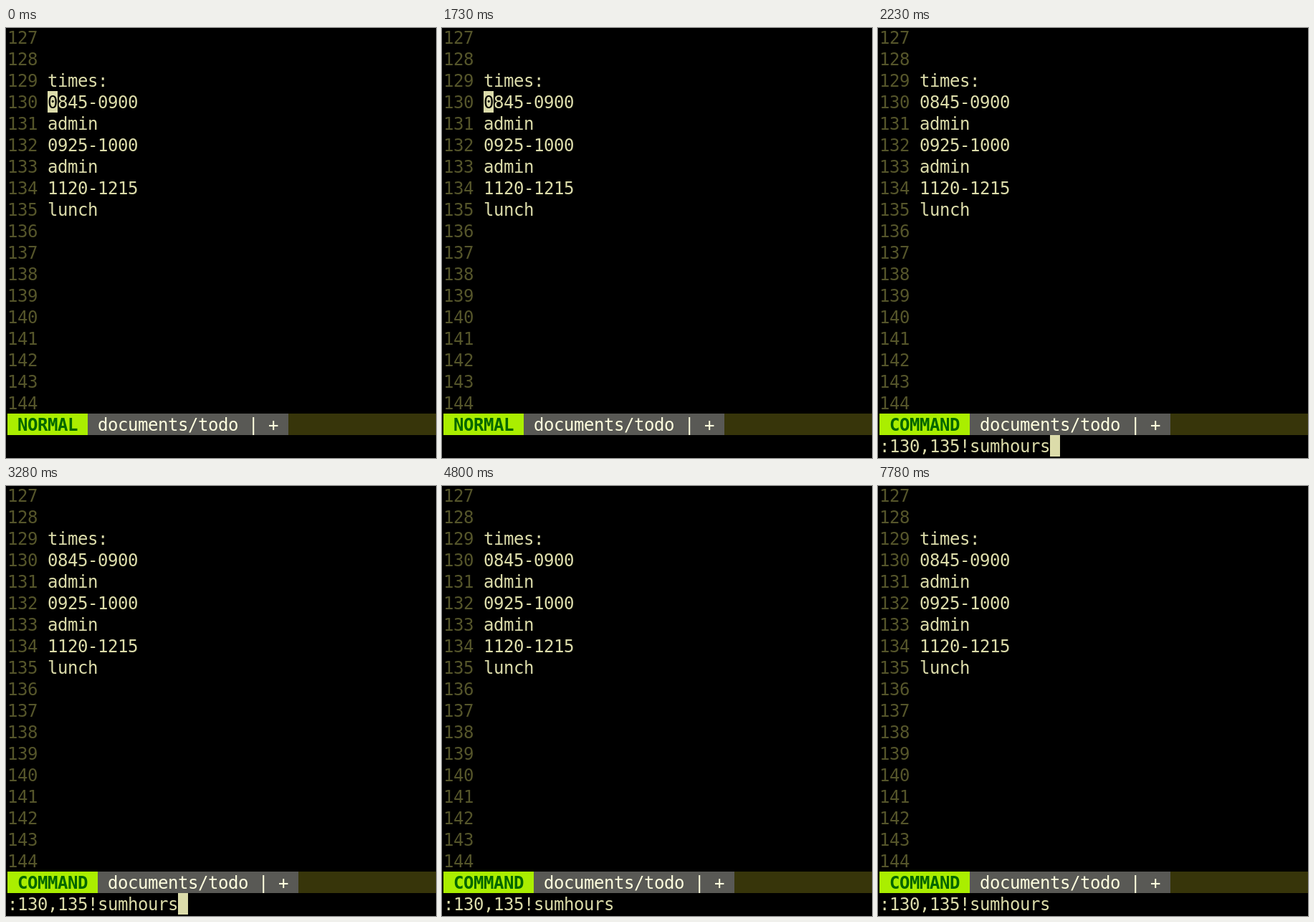
Animation of 600x600 px, one loop 8000 ms. Source, as an HTML page with a canvas:

```html
<!DOCTYPE html>
<html lang="en">
<head>
<meta charset="utf-8">
<title>Terminal editor</title>
<style>
  html, body { margin: 0; width: 100%; height: 100%; overflow: hidden; background: #000; }
  canvas { display: block; }
</style>
</head>
<body>
<canvas id="stage" width="600" height="600"></canvas>
<script>
const ctx = document.getElementById('stage').getContext('2d');
const LOOP = 8000;
const CELL_W = 14, CELL_H = 30, LEFT = 2, TOP = -2, BASELINE = 24;
const FONT = '24px "DejaVu Sans Mono", monospace';

const COLORS = {
  back: '#000', text: '#dcdcaa', number: '#55552a',
  modeBack: '#aaee00', modeText: '#006600',
  fileBack: '#595955', fileText: '#ffffdf', barBack: '#37350a'
};

const FIRST_LINE = 127, LINE_COUNT = 18, STATUS_ROW = 18, COMMAND_ROW = 19;
const BUFFER_ROW = 2, BUFFER_COL = 4;
const BUFFER = ['times:', '0845-0900', 'admin', '0925-1000', 'admin', '1120-1215', 'lunch'];
const COMMAND = ':130,135!sumhours';

const PROMPT_AT = 1900, RECALL_AT = 2230, ENTER_AT = 4620;

const cellX = col => LEFT + col * CELL_W;
const cellY = row => TOP + row * CELL_H;

function fillCells(col, row, count, color) {
  ctx.fillStyle = color;
  ctx.fillRect(cellX(col), cellY(row), count * CELL_W, CELL_H);
}

function write(text, col, row, color, bold = false) {
  ctx.font = (bold ? 'bold ' : '') + FONT;
  ctx.fillStyle = color;
  [...text].forEach((char, i) => ctx.fillText(char, cellX(col + i), cellY(row) + BASELINE));
}

function drawCursor(col, row, char = '') {
  fillCells(col, row, 1, COLORS.text);
  write(char, col, row, COLORS.back);
}

function drawStatus(mode) {
  const label = ` ${mode} `;
  const file = ' documents/todo | + ';
  fillCells(0, STATUS_ROW, 43, COLORS.barBack);
  fillCells(0, STATUS_ROW, label.length, COLORS.modeBack);
  fillCells(label.length, STATUS_ROW, file.length, COLORS.fileBack);
  write(label, 0, STATUS_ROW, COLORS.modeText, true);
  write(file, label.length, STATUS_ROW, COLORS.fileText);
}

function draw(time) {
  ctx.fillStyle = COLORS.back;
  ctx.fillRect(0, 0, 600, 600);

  for (let row = 0; row < LINE_COUNT; row++) {
    write(String(FIRST_LINE + row), 0, row, COLORS.number);
  }
  BUFFER.forEach((line, i) => write(line, BUFFER_COL, BUFFER_ROW + i, COLORS.text));

  if (time < PROMPT_AT) {
    drawStatus('NORMAL');
    drawCursor(BUFFER_COL, BUFFER_ROW + 1, BUFFER[1][0]);
    return;
  }

  const entry = time < RECALL_AT ? ':' : COMMAND;
  drawStatus('COMMAND');
  write(entry, 0, COMMAND_ROW, COLORS.text);
  if (time < ENTER_AT) drawCursor(entry.length, COMMAND_ROW);
}

const start = performance.now();
function tick() {
  draw((performance.now() - start) % LOOP);
  requestAnimationFrame(tick);
}
tick();
</script>
</body>
</html>
```
